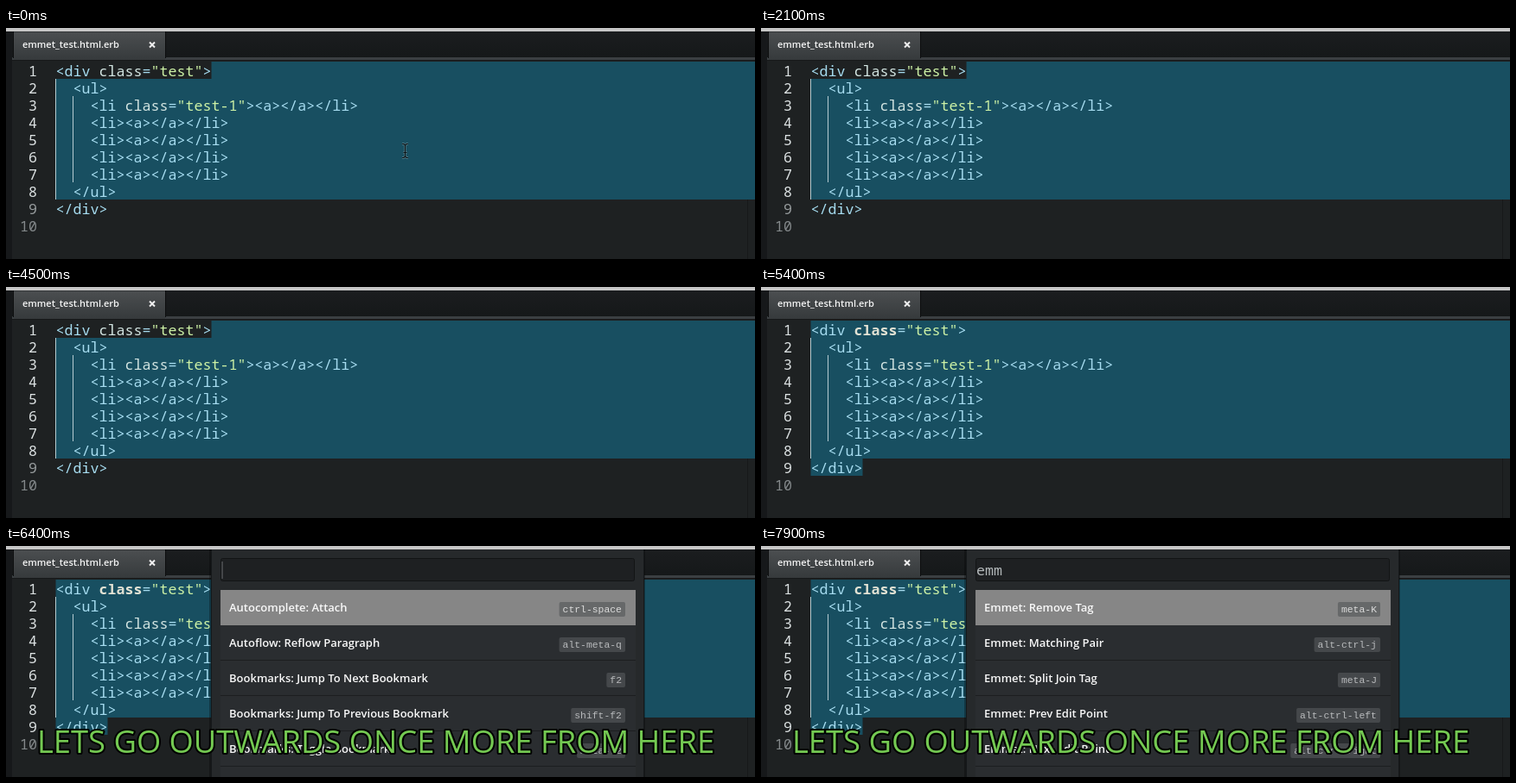
Recreate the animation shown at these times as an HTML page. Size 866x268 px, loop 8000 ms.

```html
<!DOCTYPE html>
<html lang="en">
<head>
<meta charset="utf-8">
<title>Balance outward</title>
<style>
  html, body { margin: 0; width: 100%; height: 100%; overflow: hidden; background: #1e2122; }
  svg { display: block; width: 866px; height: 268px; }
  text { white-space: pre; }
  .mono { font: 500 16.66px "Noto Sans Mono", monospace; }
  .ui { font: 600 13px "Open Sans", sans-serif; fill: #f8f8f8; }
  .tab { font: 600 11px "Open Sans", sans-serif; fill: #f4f4f4; }
  .key { font: 11.4px "Liberation Mono", monospace; fill: #b8babc; }
  .cap { font: 500 36.3px "Open Sans", sans-serif; fill: #74c952; stroke: #000; stroke-width: 4; stroke-linejoin: round; paint-order: stroke; }
  .tag { fill: #a6dcf0; }
  .attr { fill: #d3e5e2; }
  .str { fill: #cdf2a6; }
  .whole .line1 .attr { fill: #e2e2d4; font-weight: 700; }
</style>
</head>
<body>
<svg id="stage" viewBox="0 0 866 268">
  <defs>
    <linearGradient id="bar" x2="0" y2="1">
      <stop offset="0" stop-color="#1b1d1f"/><stop offset="1" stop-color="#151819"/>
    </linearGradient>
    <linearGradient id="tabFill" x2="0" y2="1">
      <stop offset="0" stop-color="#4b4e50"/><stop offset="1" stop-color="#363a3c"/>
    </linearGradient>
  </defs>
</svg>
<script>
const LOOP = 8000, ROW = 20, TOP = 39, LEFT = 57.5, CHAR = 10;
const NS = "http://www.w3.org/2000/svg";
const stage = document.getElementById("stage");

function add(parent, name, attrs, content) {
  const el = document.createElementNS(NS, name);
  for (const k in attrs) el.setAttribute(k, attrs[k]);
  if (content !== undefined) el.textContent = content;
  parent.append(el);
  return el;
}
const group = (parent = stage) => add(parent, "g", {});
const rect = (p, x, y, width, height, fill, more) =>
  add(p, "rect", { x, y, width, height, fill, ...more });
const text = (p, x, y, cls, str, more) =>
  add(p, "text", { x, y, class: cls, ...more }, str);
const show = (el, on) => el.style.display = on ? "" : "none";

// window chrome
rect(stage, 0, 0, 866, 268, "#1e2122");
rect(stage, 0, 4, 866, 31, "url(#bar)");
rect(stage, 0, 4, 7, 264, "#16181a");
rect(stage, 7, 34, 859, 3, "#3b3f42");
rect(stage, 7, 37, 859, 1, "#17191a");
rect(stage, 0, 0, 866, 4, "#c6c6c6");
add(stage, "path", { d: "M9 37V4.500H184V37Z", fill: "url(#tabFill)" });
add(stage, "path", { d: "M8.500 35V4M184.500 35V4", stroke: "#0c0d0e", fill: "none" });
text(stage, 19, 23, "tab", "emmet_test.html.erb");
add(stage, "path", { d: "M166 16.500l6 6m0-6l-6 6", stroke: "#f0f0f0", "stroke-width": 2 });
rect(stage, 857, 199, 1, 69, "#17191a");

// selections
const TEAL = "#184f61";
const lastTop = TOP + 8 * ROW;
rect(stage, LEFT, TOP + ROW, 866 - LEFT, 7 * ROW, TEAL);
const inner = group(), outer = group();
const openEnd = LEFT + 18 * CHAR;
rect(inner, openEnd, TOP, 866 - openEnd, ROW, TEAL);
rect(outer, LEFT, TOP, 866 - LEFT, ROW, TEAL);
rect(outer, LEFT, lastTop, 6 * CHAR, ROW, TEAL);

// code
const BRIGHT = "#dce1e2";
const lines = [
  '<div class="test">', "  <ul>", '    <li class="test-1"><a></a></li>',
  ...Array(4).fill("    <li><a></a></li>"), "  </ul>", "</div>", ""
];
const numbers = lines.map((line, i) => {
  const y = TOP + i * ROW + 16.5;
  const t = text(stage, LEFT, y, "mono line" + (i + 1), "");
  for (const part of line.split(/(class|"[^"]*")/)) {
    const cls = part === "class" ? "attr" : part[0] === '"' ? "str" : "tag";
    add(t, "tspan", { class: cls }, part);
  }
  return text(stage, 36, y, "mono", i + 1, { "text-anchor": "end", fill: i < 8 ? BRIGHT : "#84898b" });
});
rect(stage, 57, TOP + ROW, 1, 7 * ROW, "#b5cbd1");
rect(stage, 77, TOP + 2 * ROW, 1, 5 * ROW, "#b5cbd1");

// mouse pointer
const pointer = group();
const beam = "M458 134.500h2l1.500 1.500 1.500-1.500h2M458 150.500h2l1.500-1.500 1.500 1.500h2M461.500 136v13M459.500 144.500h4";
add(pointer, "path", { d: beam, fill: "none", stroke: "#9fb4ba", "stroke-width": 2.400, opacity: .5 });
add(pointer, "path", { d: beam, fill: "none", stroke: "#0b1518", "stroke-width": 1.200 });

// command palette
const palette = group();
rect(palette, 235, 4, 504, 264, "#000", { opacity: .3 });
rect(palette, 237, 4, 501, 264, "#15181a");
rect(palette, 238, 4, 499, 264, "#26292b");
rect(palette, 248.5, 14.5, 478, 26, "#1e2022", { stroke: "#121415", rx: 2 });
const caret = rect(palette, 249.5, 18, 1, 20, "#6a6d70");
const query = text(palette, 249, 34, "mono", "", { fill: "#b3b8ba" });

function list(items) {
  const g = group(palette);
  items.forEach(([label, key], i) => {
    const y = 51 + i * 41, w = key.length * 6.84 + 8;
    rect(g, 248, y, 480, 41, i ? "#2a2d30" : "#868686");
    if (i) rect(g, 248, y + 40, 480, 1, "#1c1e20");
    text(g, 258, y + 25, "ui", label);
    rect(g, 716 - w, y + 14, w, 17, i ? "#45484b" : "#666869", { rx: 2 });
    text(g, 720 - w, y + 26, "key", key, i ? {} : { style: "fill:#dcdcdc" });
  });
  rect(g, 248, 256, 480, 12, "#2a2d30");
  return g;
}
const allItems = list([
  ["Autocomplete: Attach", "ctrl-space"],
  ["Autoflow: Reflow Paragraph", "alt-meta-q"],
  ["Bookmarks: Jump To Next Bookmark", "f2"],
  ["Bookmarks: Jump To Previous Bookmark", "shift-f2"],
  ["Bookmarks: Toggle Bookmark", "meta-f2"]
]);
const found = list([
  ["Emmet: Remove Tag", "meta-K"],
  ["Emmet: Matching Pair", "alt-ctrl-j"],
  ["Emmet: Split Join Tag", "meta-J"],
  ["Emmet: Prev Edit Point", "alt-ctrl-left"],
  ["Emmet: Next Edit Point", "alt-ctrl-right"]
]);

const caption = text(stage, 36, 240, "cap", "LETS GO OUTWARDS ONCE MORE FROM HERE");

// times in ms
const toggles = [500, 1600, 2200, 2700, 5100];
const typed = [7300, 7500, 7700];
const HIDE = 400, CAPTION = 5800, OPEN = 6400;
const passed = (times, t) => times.filter(s => t >= s).length;

function draw(t) {
  const whole = passed(toggles, t) % 2 === 1;
  const count = passed(typed, t);
  stage.classList.toggle("whole", whole);
  show(outer, whole);
  show(inner, !whole);
  numbers[8].setAttribute("fill", whole ? BRIGHT : "#979c9e");
  show(pointer, t < HIDE);
  show(caption, t >= CAPTION);
  show(palette, t >= OPEN);
  show(allItems, count < 2);
  show(found, count >= 2);
  show(caret, count === 0);
  query.textContent = "emm".slice(0, count);
}

const start = performance.now();
function tick() {
  draw((performance.now() - start) % LOOP);
  requestAnimationFrame(tick);
}
tick();
</script>
</body>
</html>
```
